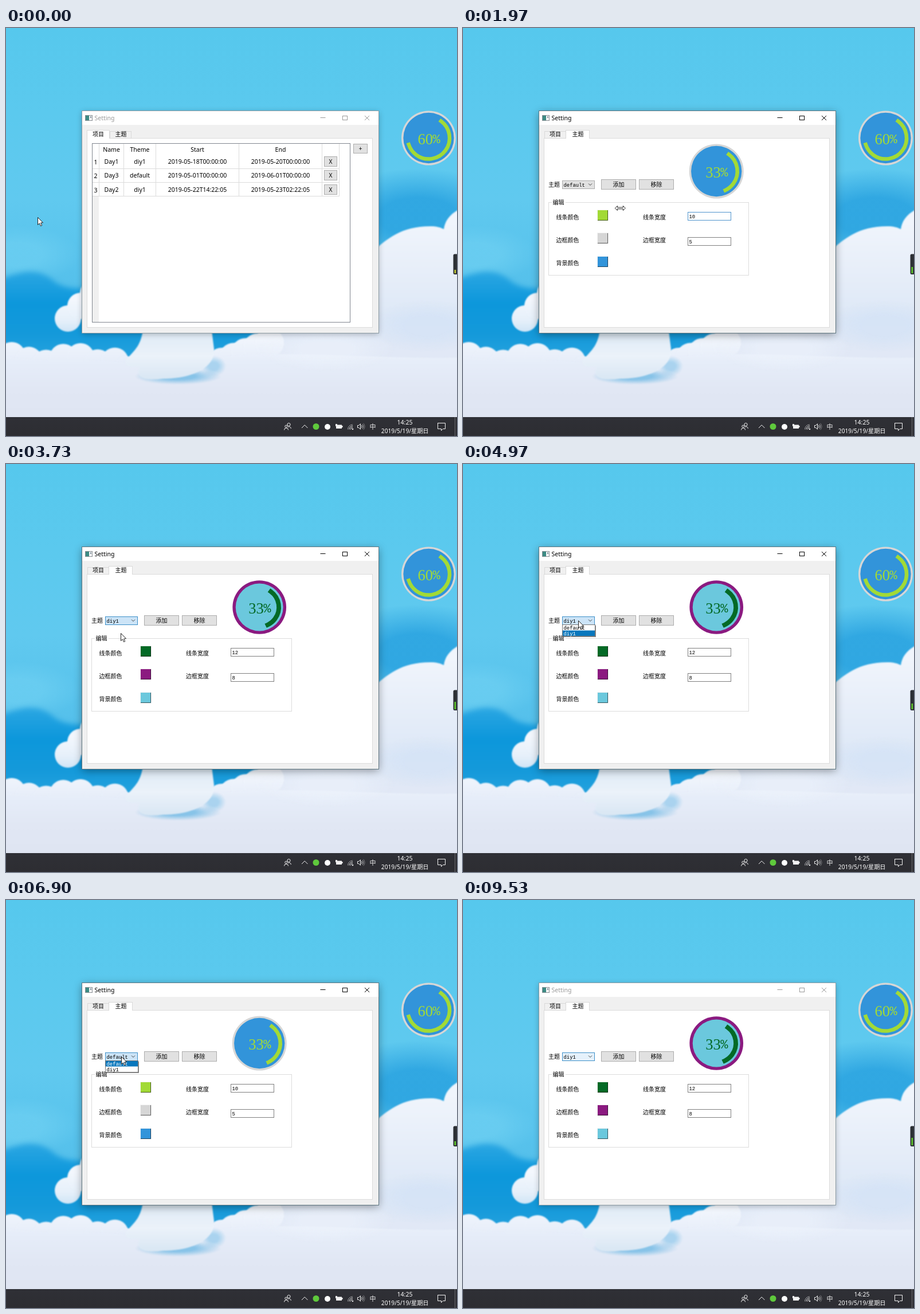
An HTML page with a canvas for the animation above (9560 ms loop, 787x712 px).

```html
<!DOCTYPE html>
<html lang="zh">
<head>
<meta charset="utf-8">
<title>Setting</title>
<style>
html, body { margin: 0; width: 100%; height: 100%; overflow: hidden; background: #5ac8ee; }
canvas { display: block; }
</style>
</head>
<body>
<canvas id="stage" width="787" height="712"></canvas>
<script>
const W = 787, H = 712, LOOP = 9560, TAU = Math.PI * 2;
const stage = document.getElementById('stage').getContext('2d');
let c = stage;

const CJK = '"Noto Sans CJK SC", "Noto Sans CJK", sans-serif';
const UI = `"Noto Sans", ${CJK}`;
const MONO = '"Liberation Mono", monospace';
const SERIF = '"Liberation Serif", serif';

const THEMES = {
  default: { line: '#a2da36', edge: '#d6d6d6', back: '#3294da', lineW: 10, edgeW: 5 },
  diy1: { line: '#046a26', edge: '#8b1a80', back: '#6bc8dd', lineW: 12, edgeW: 8 }
};
const NAMES = Object.keys(THEMES);
const ROWS = [
  ['Day1', 'diy1', '2019-05-18T00:00:00', '2019-05-20T00:00:00'],
  ['Day3', 'default', '2019-05-01T00:00:00', '2019-06-01T00:00:00'],
  ['Day2', 'diy1', '2019-05-22T14:22:05', '2019-05-23T02:22:05']
];
const COLS = [162, 205, 261, 406, 551, 581];

const SWITCH = 1000, BLUR = 9500;
const POPUPS = [[2500, 3730], [4970, 6230], [6900, 7930]];

// Pointer: each popup has one move to the combo box and one to a list item
const HOME = [55, 330], COMBO = [201, 273];
const MOVES = [
  { from: 30, to: 900, at: [212, 188] },
  { from: 1500, to: 1960, at: [274, 314] },
  ...POPUPS.flatMap(([open], i) => [
    { from: open - 540, to: open - 140, at: COMBO },
    { from: open + 220, to: open + 700, at: i % 2 ? [200, 282] : [200, 295] }
  ]),
  { from: 8420, to: 8600, at: [-24, 338] }
];

const clamp = v => Math.max(0, Math.min(1, v));
const ease = v => v * v * (3 - 2 * v);
const mix = (a, b, k) => a + (b - a) * k;

function rect(x, y, w, h, fill, edge) {
  if (fill) { c.fillStyle = fill; c.fillRect(x, y, w, h); }
  if (edge) { c.strokeStyle = edge; c.lineWidth = 1; c.strokeRect(x + .5, y + .5, w - 1, h - 1); }
}
function line(color, ...p) {
  c.strokeStyle = color;
  c.lineWidth = 1;
  c.beginPath();
  for (let i = 0; i < p.length; i += 2) c.lineTo(p[i], p[i + 1]);
  c.stroke();
}
function disc(x, y, r, fill) {
  c.fillStyle = fill;
  c.beginPath();
  c.arc(x, y, r, 0, TAU);
  c.fill();
}
function arc(x, y, r, from, to, color, width = 1) {
  c.strokeStyle = color;
  c.lineWidth = width;
  c.beginPath();
  c.arc(x, y, r, from, to);
  c.stroke();
}
function text(s, x, mid, { size = 10.5, font = UI, color = '#000', align = 'center' } = {}) {
  c.font = `${size}px ${font}`;
  c.fillStyle = color;
  c.textAlign = align;
  c.fillText(s, x, mid + size * .36);
}
const label = (s, x, y) => text(s, x, y, { size: 10, font: CJK, align: 'left' });
const mono = (s, x, y, color) => text(s, x, y - .3, { size: 8.9, font: MONO, color, align: 'left' });

function button(x, y, w, h, s, font = CJK) {
  rect(x, y, w, h, '#e1e1e1', '#adadad');
  text(s, x + w / 2, y + h / 2, { size: 10, font });
}

function gauge(x, y, percent, { line: ink, edge, back, lineW, edgeW }) {
  const outer = 48.6 - edgeW * .22, inner = outer - edgeW * .67;
  disc(x, y, outer, edge);
  disc(x, y, inner, back);
  const from = -.3 * Math.PI;
  c.lineCap = 'square';
  arc(x, y, inner - 7.6, from, from + percent / 100 * TAU, ink, lineW * .65);
  c.lineCap = 'butt';
  text(percent, x - 19, y + 1, { size: 26.5, font: SERIF, color: ink, align: 'left' });
  text('%', x + 7, y + 1, { size: 22, font: MONO, color: ink, align: 'left' });
}

// ---------- desktop ----------
function shade(y0, y1, ...colors) {
  const g = c.createLinearGradient(0, y0, 0, y1);
  colors.forEach((col, i) => g.addColorStop(i / (colors.length - 1), col));
  return g;
}
function soft(x, y, rx, ry, color) {
  c.save();
  c.translate(x, y);
  c.scale(rx, ry);
  const g = c.createRadialGradient(0, 0, .4, 0, 0, 1);
  g.addColorStop(0, color);
  g.addColorStop(1, color.slice(0, 7) + '00');
  c.fillStyle = g;
  c.fillRect(-1, -1, 2, 2);
  c.restore();
}
// Closed shape: start point, then one bezier (6 numbers) or corner (2) per part
function shape(fill, x, y, ...parts) {
  c.fillStyle = fill;
  c.beginPath();
  c.moveTo(x, y);
  for (const p of parts) p.length > 2 ? c.bezierCurveTo(...p) : c.lineTo(...p);
  c.fill();
}
// Row of round puffs whose upper edge follows top(x)
function puffs(from, to, step, r, top, fill) {
  for (let x = from; x <= to; x += step) disc(x, top(x) + r, r, fill);
}

function wallpaper() {
  rect(0, 0, W, H, shade(0, 600, '#56c8ed', '#5bc9ee', '#60c9ef', '#55c0eb', '#3aaee6'));
  soft(720, 330, 170, 85, '#2aa3e0e0');
  soft(20, 395, 110, 50, '#6ed0f2b0');

  c.filter = 'blur(5px)';
  shape(shade(425, 590, '#2ba6e2', '#0c97db', '#1499da', '#2aa5df'), -20, 440,
    [10, 434, 30, 420, 60, 428], [85, 436, 80, 448, 115, 454], [470, 470], [470, 620], [-20, 620]);
  c.filter = 'blur(.8px)';

  puffs(108, 152, 22, 23, x => 592 - x, shade(475, 545, '#f3f7fd', '#e6f0fa', '#bfdcf3'));

  shape(shade(340, 680, '#f0f5fc', '#e7eef9', '#dde8f7', '#e3e9f6', '#e0e5f3'), 640, 390,
    [665, 368, 690, 346, 740, 346], [752, 346, 758, 348, 764, 351], [766, 336, 775, 322, 800, 312],
    [800, 690], [440, 690], [440, 530], [640, 500]);

  const low = shade(535, 680, '#f3f7fd', '#e6edf9', '#e1e7f4', '#dfe5f2');
  puffs(10, 190, 30, 24, x => 555 - 7 * Math.cos((x - 10) / 17), low);
  puffs(210, 240, 30, 24, () => 573, low);
  puffs(376, 460, 21, 25, x => 558 - (x - 376) * .4, low);
  shape(low, -10, 572, [90, 590, 150, 570, 235, 590], [300, 606, 340, 592, 375, 575],
    [480, 560, 680, 580, 800, 575], [800, 690], [-10, 690]);

  soft(735, 520, 100, 45, '#cfe0f680');
  soft(560, 560, 120, 40, '#edf3fc90');
  soft(300, 608, 75, 14, '#5eb2e2b0');
  soft(362, 590, 22, 18, '#7cc0e890');

  // Seated white shape behind the window
  shape(shade(530, 615, '#dfebf6', '#ebf2fa', '#d8e6f3'), 240, 520,
    [236, 555, 226, 560, 209, 580], [206, 592, 222, 592, 233, 590], [224, 612, 244, 616, 275, 612],
    [325, 612, 366, 592, 363, 560], [358, 520]);
  c.filter = 'none';
}

function tray() {
  rect(0, 679, W, 33, shade(679, 712, '#2f3036', '#2d2d32'));
  const ink = '#f2f2f2';
  arc(493.5, 692, 2.6, 0, TAU, ink);
  arc(488.8, 695.2, 2, 0, TAU, ink);
  arc(489, 701.5, 3.5, Math.PI, TAU, ink);
  arc(494, 699, 3.3, -2.2, 0, ink);
  line(ink, 516, 698, 521.2, 692.8, 526.4, 698);
  disc(541, 695.5, 5.5, '#5fc93c');
  disc(561, 696, 5, '#fff');
  rect(576, 692.5, 10, 6.5, ink);
  rect(575, 691, 3, 4, ink);
  rect(586, 694, 1.5, 3, ink);
  for (let i = 0; i < 3; i++) {
    arc(605, 700.5, 3.5 + i * 2.5, Math.PI, 1.5 * Math.PI, i < 2 ? ink : '#a5a5a8');
    arc(618, 695.5, 3.2 + i * 2.4, -.8, .8, `rgba(242,242,242,${1 - i * .3})`);
  }
  disc(605, 700, 1.2, ink);
  line(ink, 613.5, 693.5, 615.5, 693.5, 618.5, 690.8, 618.5, 700.2, 615.5, 697.5, 613.5, 697.5, 613.5, 693.5);
  text('中', 640, 695.7, { size: 11, font: CJK, color: ink });
  text('14:25', 696, 688, { color: '#fff' });
  text('2019/5/19/星期日', 696.2, 703, { size: 10.2, color: '#fff' });
  line(ink, 753.5, 689.5, 766.5, 689.5, 766.5, 699.5, 762.5, 699.5, 759.5, 702.5, 759.5, 699.5, 753.5, 699.5, 753.5, 689);
  line('#6c6c70', 783.5, 679, 783.5, 712);
}

const desktop = document.createElement('canvas');
desktop.width = W;
desktop.height = H;
c = desktop.getContext('2d');
wallpaper();
tray();
gauge(737.5, 192, 60, THEMES.default);
c = stage;

// Small load meter at the right edge, refreshed each second
function meter(t) {
  const second = Math.floor((t + 470) / 1000);
  const top = Math.round(418 + 3.5 * Math.cos(second * TAU / 6.8));
  c.fillStyle = '#2c3035';
  c.beginPath();
  c.roundRect(780.5, 394.5, 12, 35.5, 2.5);
  c.fill();
  rect(782.5, top, 2.5, 428 - top, top > 421 ? '#c8cf35' : '#62cf2c');
}

// ---------- window ----------
function frame(active) {
  c.save();
  c.shadowColor = `rgba(0,0,0,${active ? .4 : .28})`;
  c.shadowBlur = active ? 14 : 10;
  c.shadowOffsetY = active ? 3 : 2;
  rect(133, 145, 517, 387, '#f0f0f0');
  c.restore();
  rect(132, 144, 519, 389, null, active ? '#5f7680' : '#8b9aa2');
  rect(133, 145, 517, 24, '#fff');

  rect(138, 152, 13, 10, '#f5f5f5', '#8a8f94');
  rect(139, 153, 6, 8, '#3d8b84');
  rect(147, 154, 2, 3, '#8a9aa5');
  const ink = active ? '#000' : '#999';
  text('Setting', 154.5, 157, { color: ink, align: 'left' });
  line(ink, 548.5, 156.5, 557.5, 156.5);
  rect(587, 153, 9, 8, null, ink);
  line(ink, 626, 153, 634, 161);
  line(ink, 634, 153, 626, 161);
}

function tab(x, right, on, s, mid, fill) {
  const y = on ? 178 : 180;
  rect(x, y, right - x, 193 - y, on ? '#fff' : fill, '#d9d9d9');
  if (on) rect(x + 1, 191, right - x - 2, 3, '#fff');
  text(s, mid, 185.7, { size: 10, font: CJK });
}
function tabs(second, hover) {
  rect(141, 192, 499, 331, '#fff', '#dcdcdc');
  tab(second ? 142 : 141, 181, !second, '项目', 161, '#f0f0f0');
  tab(second ? 179 : 181, second ? 221 : 219, second, '主题', 200.5, hover ? '#d8eaf9' : '#f0f0f0');
}

function tablePage() {
  rect(150, 201, 451, 313, '#fff', '#828790');
  rect(151, 294, 11, 219, '#f0f0f0');
  const grid = '#dcdcdc';
  COLS.forEach(x => line(grid, x + .5, 202, x + .5, 294));
  const mid = i => (COLS[i] + COLS[i + 1]) / 2 + .5;
  ['Name', 'Theme', 'Start', 'End'].forEach((s, i) => text(s, mid(i), 211.8));
  ROWS.forEach((row, r) => {
    const y = 233 + r * 24.4, base = Math.floor(y + 12) + .5;
    line(grid, 151, base, 582, base);
    text(r + 1, 156.5, y + 1);
    row.forEach((s, i) => text(s, mid(i), y));
    button(555, Math.round(y - 9), 23, 18, 'X', UI);
  });
  button(606, 202, 25, 17, '+', UI);
}

function swatch(y, color) {
  rect(234, y, 20, 20, '#f4f4f4');
  rect(235, y + 1, 18, 18, color);
  line('rgba(0,0,0,.55)', 235, y + 18.5, 252.5, y + 18.5, 252.5, y + 1);
}
function field(y, value, focus) {
  rect(392, y, 76, 15, '#fff', focus ? '#4f94cd' : '#7f7f7f');
  mono(value, 394.5, y + 8);
}

function combo({ theme, hot, press }) {
  const lit = `rgb(${mix(229, 204, press)},${mix(241, 228, press)},${mix(251, 247, press)})`;
  rect(173, 266, 57, 15, hot ? lit : '#e1e1e1', hot ? '#3c8fc8' : '#adadad');
  mono(theme, 175.5, 273.8);
  line('#444', 219, 271.5, 222, 274.5, 225, 271.5);
}
function popup({ theme, y }) {
  rect(175, 282, 57, 20, 'rgba(0,0,0,.45)');
  rect(173, 280, 58, 21, '#fff', '#777');
  const pick = y < 281 ? theme : NAMES[y < 290.5 ? 0 : 1];
  NAMES.forEach((name, i) => {
    const top = 281 + i * 9.5, on = name === pick;
    if (on) rect(174, top, 56, 9.5, '#0877bd');
    mono(name, 175.5, top + 5.2, on ? '#fff' : '#000');
  });
}

function themePage(s) {
  const th = THEMES[s.theme];
  gauge(442.2, 250, 33, th);
  label('主题', 149, 273);
  combo(s);
  button(241, 264, 61, 18, '添加');
  button(307, 264, 61, 18, '移除');
  rect(149, 304, 350, 128, null, '#dcdcdc');
  rect(155, 302, 24, 5, '#fff');
  label('编辑', 156.5, 304);
  ['线条', '边框', '背景'].forEach((s, i) => {
    const y = 330 + i * 40;
    label(s + '颜色', 162.5, y);
    if (i < 2) label(s + '宽度', 314, y);
  });
  [th.line, th.edge, th.back].forEach((color, i) => swatch(Math.round(316.6 + i * 40.5), color));
  field(321, th.lineW, s.t < POPUPS[0][0]);
  field(365, th.edgeW);
  if (s.open) popup(s);
}

// ---------- pointer ----------
function outline(points) {
  c.beginPath();
  points.forEach(([x, y]) => c.lineTo(x, y));
  c.closePath();
  c.fillStyle = '#fff';
  c.fill();
  c.strokeStyle = '#222';
  c.lineWidth = 1;
  c.stroke();
}
function pointer({ x, y, t }) {
  c.save();
  c.translate(x + .5, y + .5);
  if (x > 130 && t < 2400) {
    const half = [[-9, 0], [-5, -4], [-5, -1.3], [5, -1.3], [5, -4]];
    outline([...half, ...half.map(([a, b]) => [-a, -b])]);
  } else {
    outline([[0, 0], [0, 13], [3, 10.3], [5, 15], [7.2, 14], [5.2, 9.5], [9, 9.2]]);
  }
  c.restore();
}

function position(t) {
  return MOVES.reduce(([x, y], { from, to, at }) => {
    const k = ease(clamp((t - from) / (to - from)));
    return [mix(x, at[0], k), mix(y, at[1], k)];
  }, HOME);
}

function stateAt(t) {
  const [x, y] = position(t);
  const open = POPUPS.some(([a, b]) => t >= a && t < b);
  const done = POPUPS.filter(p => t >= p[1]);
  const since = done.length ? t - done[done.length - 1][1] : Infinity;
  return {
    t, x, y, open,
    theme: NAMES[done.length % 2],
    hot: t >= POPUPS[0][0] - 170,
    press: open ? 1 : 1 - clamp(since / 200)
  };
}

function draw(t) {
  const s = stateAt(t), second = t >= SWITCH;
  c.drawImage(desktop, 0, 0);
  meter(t);
  frame(second && t < BLUR);
  tabs(second, s.x > 181 && s.x < 219 && s.y > 179 && s.y < 193);
  if (second) themePage(s);
  else tablePage();
  pointer(s);
}

const start = performance.now();
function tick() {
  draw((performance.now() - start) % LOOP);
  requestAnimationFrame(tick);
}
tick();
</script>
</body>
</html>
```
